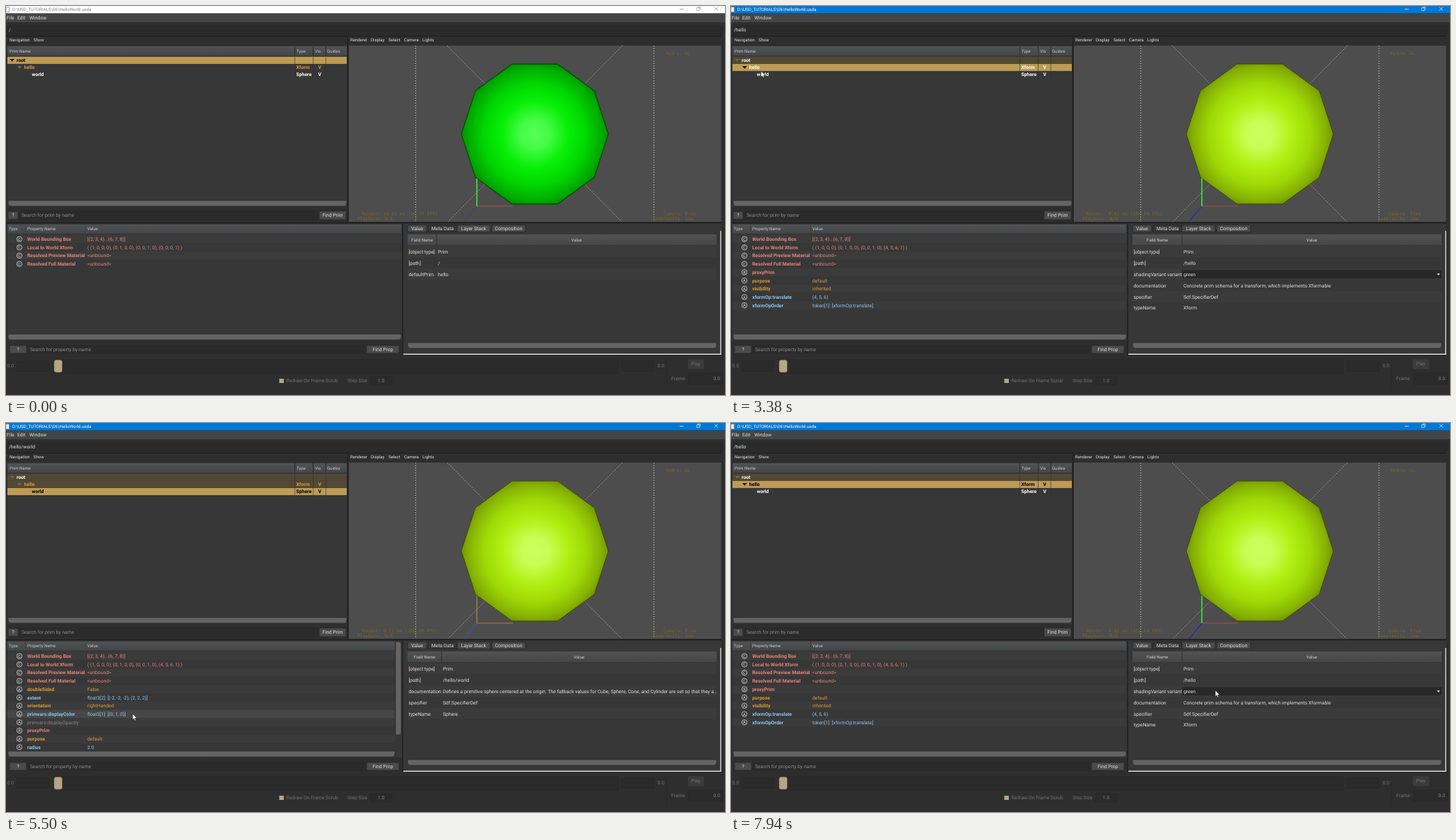
Recreate the animation shown at these times as an HTML page with a canvas. Size 1017 px wide and 550 px high, loop 7990 ms.

```html
<!DOCTYPE html>
<html lang="en">
<head>
<meta charset="utf-8">
<title>Scene viewer</title>
<style>
html, body { margin: 0; width: 100%; height: 100%; overflow: hidden; background: #2e2e2e; }
canvas { display: block; }
</style>
</head>
<body>
<canvas id="stage" width="1017" height="550"></canvas>
<script>
const g = document.getElementById('stage').getContext('2d');
const LOOP = 7990;
const SALMON = '#e88578', ORANGE = '#de9a35', BLUE = '#8cc5f0', GREY = '#858585';
const LIGHT = '#e0e0e0', GOLD = '#bd9b54', DIM = '#777470';

// Cursor legs: start, end, control point, end point
const START = [948, 109];
const LEGS = [
  [420, 930, 720, 50, 495, 4],
  [1180, 1390, 498, 14, 498, 27],
  [1600, 2350, 170, 272, 41, 90],
  [3350, 3450, 44, 94, 46, 98],
  [3680, 4130, 300, 150, 663, 340],
  [4160, 4930, 450, 581, 100, 398],
  [5010, 5200, 40, 395, 16, 411],
  [5200, 5460, 100, 411, 179, 411],
  [5560, 5790, 170, 411, 162, 411],
  [5820, 5950, 156, 411, 150, 411],
  [6360, 6860, 100, 250, 54, 103],
  [6980, 7140, 50, 95, 46, 87],
  [7330, 7900, 300, 200, 685, 378]
];

const COMMON = xf => [
  ['C', 'World Bounding Box', '[(2, 3, 4)...(6, 7, 8)]', SALMON],
  ['C', 'Local to World Xform', `( (1, 0, 0, 0), (0, 1, 0, 0), (0, 0, 1, 0), (${xf}) )`, SALMON],
  ['C', 'Resolved Preview Material', '<unbound>', SALMON],
  ['C', 'Resolved Full Material', '<unbound>', SALMON]
];

const PRIMS = [
  {
    name: 'root', type: '', path: '/', split: 609,
    stats: '10.02 ms (99.77 FPS)',
    props: COMMON('0, 0, 0, 1'),
    meta: [['[object type]', 'Prim'], ['[path]', '/'], ['defaultPrim', 'hello']]
  },
  {
    name: 'hello', type: 'Xform', path: '/hello', split: 638,
    stats: '9.82 ms (101.84 FPS)',
    props: [
      ...COMMON('4, 5, 6, 1'),
      ['R', 'proxyPrim', '', SALMON],
      ['A', 'purpose', 'default', ORANGE],
      ['A', 'visibility', 'inherited', ORANGE],
      ['A', 'xformOp:translate', '(4, 5, 6)', BLUE],
      ['A', 'xformOpOrder', 'token[1]: [xformOp:translate]', BLUE]
    ],
    meta: [
      ['[object type]', 'Prim'], ['[path]', '/hello'], ['shadingVariant variant', 'green', true],
      ['documentation', 'Concrete prim schema for a transform, which implements Xformable'],
      ['specifier', 'Sdf.SpecifierDef'], ['typeName', 'Xform']
    ]
  },
  {
    name: 'world', type: 'Sphere', path: '/hello/world', split: 616,
    stats: '9.71 ms (103.00 FPS)',
    props: [
      ...COMMON('4, 5, 6, 1'),
      ['A', 'doubleSided', 'False', ORANGE],
      ['A', 'extent', 'float3[2]: [(-2, -2, -2), (2, 2, 2)]', BLUE],
      ['A', 'orientation', 'rightHanded', ORANGE],
      ['A', 'primvars:displayColor', 'float3[1]: [(0, 1, 0)]', BLUE],
      ['A', 'primvars:displayOpacity', '', GREY],
      ['R', 'proxyPrim', '', SALMON],
      ['A', 'purpose', 'default', ORANGE],
      ['A', 'radius', '2.0', BLUE]
    ],
    meta: [
      ['[object type]', 'Prim'], ['[path]', '/hello/world'],
      ['documentation', 'Defines a primitive sphere centered at the origin. The fallback values for Cube, Sphere, Cone, and Cylinder are set so that they a...'],
      ['specifier', 'Sdf.SpecifierDef'], ['typeName', 'Sphere']
    ]
  }
];

function rect(x0, y0, x1, y1, fill) {
  g.fillStyle = fill;
  g.fillRect(x0, y0, x1 - x0, y1 - y0);
}

function round(x0, y0, x1, y1, r, fill, stroke) {
  g.beginPath();
  g.roundRect(x0, y0, x1 - x0, y1 - y0, r);
  g.fillStyle = fill;
  g.fill();
  if (stroke) {
    g.strokeStyle = stroke;
    g.lineWidth = 0.7;
    g.stroke();
  }
}

function line(x0, y0, x1, y1, color, width = 1, dash = []) {
  g.beginPath();
  g.moveTo(x0, y0);
  g.lineTo(x1, y1);
  g.strokeStyle = color;
  g.lineWidth = width;
  g.setLineDash(dash);
  g.stroke();
  g.setLineDash([]);
}

// y is the middle of the capitals
function text(s, x, y, color = LIGHT, { size = 6.85, bold = false, align = 'left', font = 'Roboto, sans-serif' } = {}) {
  g.font = `${bold ? 'bold ' : ''}${size}px ${font}`;
  g.textAlign = align;
  g.fillStyle = color;
  g.fillText(s, x, y + 2.4);
}

function poly(points, fill, stroke, width = 1) {
  g.beginPath();
  points.forEach(([x, y]) => g.lineTo(x, y));
  g.closePath();
  g.fillStyle = fill;
  g.fill();
  if (stroke) {
    g.strokeStyle = stroke;
    g.lineWidth = width;
    g.stroke();
  }
}

function header(x0, y0, x1, y1) {
  const shade = g.createLinearGradient(0, y0, 0, y1);
  shade.addColorStop(0, '#505356');
  shade.addColorStop(1, '#44474a');
  rect(x0, y0, x1, y1, shade);
}

function button(x0, y0, x1, y1, label) {
  round(x0, y0, x1, y1, 1.5, '#4b4b4b', '#282828');
  text(label, (x0 + x1) / 2, (y0 + y1) / 2, LIGHT, { align: 'center' });
}

const field = (x0, y0, x1, y1) => round(x0, y0, x1, y1, 1.5, '#2b2b2b', '#272727');
const scrollbar = (x0, y0, x1, y1) => round(x0, y0, x1, y1, [1, 1, 4, 4], '#646464', '#2a2a2a');

function cursorAt(t) {
  let [x, y] = START;
  for (const [t0, t1, cx, cy, ex, ey] of LEGS) {
    if (t < t0) break;
    const k = Math.min(1, (t - t0) / (t1 - t0));
    const u = k * k * (3 - 2 * k), v = 1 - u;
    x = v * v * x + 2 * u * v * cx + u * u * ex;
    y = v * v * y + 2 * u * v * cy + u * u * ey;
  }
  return [x, y];
}

function titleBar(active) {
  rect(0, 0, 1017, 10.5, active ? '#0078d7' : '#fdfdfd');
  round(0, 1.5, 4.5, 8.5, 0.5, '#f4f4f4', '#888');
  const color = active ? '#fff' : '#858585';
  text('D:\\USD_TUTORIALS\\06\\HelloWorld.usda', 9, 5, color, { size: 6.17 });
  line(953, 4.5, 958.5, 4.5, color, 0.7);
  g.strokeStyle = color;
  g.lineWidth = 0.6;
  g.strokeRect(977, 2.7, 3.8, 3.8);
  line(978.2, 1.4, 982.2, 1.4, color, 0.6);
  line(982.2, 1.4, 982.2, 5.4, color, 0.6);
  line(1002, 1.5, 1007, 6.5, color, 0.7);
  line(1007, 1.5, 1002, 6.5, color, 0.7);
}

function menus(path) {
  rect(0, 10.5, 1017, 23, '#444546');
  [['File', 1], ['Edit', 16], ['Window', 33]].forEach(([s, x]) => text(s, x, 17));
  field(1, 28, 1013, 40);
  text(path, 4, 34);
  const small = { size: 6 };
  [['Navigation', 5], ['Show', 39], ['Renderer', 487], ['Display', 516],
   ['Select', 541], ['Camera', 563], ['Lights', 589]].forEach(([s, x]) => text(s, x, 48, LIGHT, small));
  line(0, 42.5, 1012, 42.5, '#1c1c1c');
}

function tree(sel, mx, my) {
  const small = { size: 6 };
  rect(2, 56, 482, 284, '#373737');
  header(2, 57, 482, 70);
  [['Prim Name', 5], ['Type', 411], ['Vis', 437], ['Guides', 454]].forEach(([s, x]) => text(s, x, 63.5, '#c8c8c8', small));
  const inTree = mx < 482 && my > 72 && my < 108;
  PRIMS.forEach((p, i) => {
    const y = 76.8 + i * 10.1, chosen = i === sel;
    if (chosen || i < sel) rect(2, y - 5, 482, y + 5, chosen ? GOLD : '#514835');
    const hover = inTree && !chosen && Math.abs(my - y) < 5;
    if (hover) {
      g.strokeStyle = '#858585';
      g.lineWidth = 0.8;
      g.strokeRect(24.5, y - 4.6, 457, 9.2);
    }
    const color = chosen ? (inTree ? '#fff' : '#000') : i === 1 ? ORANGE : '#fff';
    const bold = { bold: true };
    const x = 15 + i * 10.7;
    if (i < 2) {
      const a = x - 9.7;
      poly([[a, y - 1.8], [a + 6.6, y - 1.8], [a + 3.3, y + 1.8]], chosen ? '#111' : '#75684c');
    }
    text(p.name, x, y, color, bold);
    text(p.type, 410.5, y, color, bold);
    if (i) text('V', 441.5, y, color, bold);
  });
  [408.5, 434.5, 452.5].forEach(x => {
    line(x, 57, x, 70, '#2a2a2a');
    line(x, 72, x, 102, 'rgba(45,45,45,.7)', 0.8);
  });
  scrollbar(3, 275, 482, 283);
  button(3, 290.5, 17, 301.5, '?');
  field(19, 290, 440, 302);
  text('Search for prim by name', 22, 296, '#8c8c8c');
  button(443, 290, 481, 302, 'Find Prim');
  line(483.5, 43, 483.5, 305, '#1c1c1c');
}

function viewport(sel) {
  g.save();
  g.beginPath();
  g.rect(485, 56, 526.5, 249);
  g.clip();
  rect(485, 56, 1012, 305, '#4d4d4d');
  const dash = [1.5, 2];
  const guide = '#bcbcbc';
  line(579.5, 56, 579.5, 305, guide, 0.9, dash);
  line(916.5, 56, 916.5, 305, guide, 0.9, dash);
  line(624, 56, 872, 306, guide, 0.9, dash);
  line(872, 56, 624, 306, guide, 0.9, dash);

  const cx = 748, cy = 181, r = 104;
  const shade = g.createRadialGradient(cx, cy, 0, cx, cy, r);
  const colors = sel
    ? ['#ccff60', '#c6ff54', '#b0f012', '#9ed806', '#86b203', '#729600']
    : ['#56ff56', '#46fc46', '#08f008', '#00d600', '#00ac00', '#009000'];
  [0, 0.19, 0.45, 0.7, 0.9, 1].forEach((s, i) => shade.addColorStop(s, colors[i]));
  const rim = Array.from({ length: 10 }, (_, i) => {
    const a = i * Math.PI / 5;
    return [cx + r * Math.cos(a), cy + r * Math.sin(a)];
  });
  poly(rim, shade, sel ? '#3c4a10' : '#0a540a', sel ? 1 : 1.6);

  line(666, 283, 648, 305, ['#45456a', '#2828c0', '#3c4cb4'][sel], 1.2);
  line(666, 283, 717, 283, ['#a85d42', '#b84a38', '#b87a3c'][sel], 1.2);
  line(666, 244, 666, 283, sel === 2 ? '#a0a03c' : '#3ce63c', sel === 2 ? 1 : 1.6);

  const hud = { size: 6.4, font: '"DejaVu Sans Mono", monospace' };
  [['Hydra: GL', 933, 66.5], [`Render: ${PRIMS[sel].stats}`, 503, 293.5], ['Playback: N/A', 497, 300.5],
   ['Camera: Free', 930, 293.5], ['Complexity: Low', 915, 300.5]].forEach(([s, x, y]) => text(s, x, y, '#7d662a', hud));
  g.restore();
}

function properties(prim, mx, my) {
  const tall = prim.props.length > 10, right = tall ? 550 : 559;
  rect(2, 308, 560, 473, '#373737');
  header(2, 309, right, 321.5);
  [['Type', 4], ['Property Name', 30], ['Value', 115]].forEach(([s, x]) => text(s, x, 315, '#c8c8c8', { size: 6 }));
  [27.5, 112.5].forEach(x => line(x, 309, x, 321, '#3a3c3e', 0.8));
  prim.props.forEach(([kind, name, value, color], i) => {
    const y = 329.6 + i * 11.7;
    const hover = mx < right && Math.abs(my - y) < 5.85;
    rect(2, y - 5.85, right, y + 5.85, hover ? '#474747' : i % 2 ? '#373737' : '#3b3b3b');
    g.beginPath();
    g.arc(19, y, 3.7, 0, 7);
    g.strokeStyle = '#d8d8d8';
    g.lineWidth = 0.8;
    g.stroke();
    text(kind, 19, y - 0.3, '#e8e8e8', { size: 5.8, align: 'center' });
    text(name, 30, y, color, { bold: color !== GREY });
    text(value, 115, y, color);
  });
  if (tall) round(551, 309, 559, 441, [1, 4, 4, 1], '#646464', '#2a2a2a');
  scrollbar(3, 464, right, 472);
  button(5, 480, 29, 491, '?');
  field(31, 480, 507, 491);
  text('Search for property by name', 34, 485.5, '#8c8c8c');
  button(510, 480, 556, 491, 'Find Prop');
}

function metadata({ meta, split }, mx, my) {
  rect(562, 308, 1012, 493, '#373737');
  [['Value', 568, 595], ['Meta Data', 597, 638], ['Layer Stack', 638, 685], ['Composition', 687, 735]].forEach(([s, a, b], i) => {
    round(a, 309.5, b, 319.5, [2, 2, 0, 0], i === 1 ? '#373737' : '#4a4a4a', '#222');
    text(s, (a + b) / 2, 314.3, LIGHT, { align: 'center' });
  });
  header(568, 323, 1005, 338);
  text('Field Name', (568 + split) / 2, 330.5, '#d0d0d0', { size: 6, align: 'center' });
  text('Value', (split + 1005) / 2, 330.5, '#d0d0d0', { size: 6, align: 'center' });
  line(split, 323, split, 338, '#2a2a2a', 0.8);
  meta.forEach(([name, value, combo], i) => {
    const y = 347.3 + i * 15.95;
    rect(568, y - 8, 1005, y + 8, i % 2 ? '#373737' : '#3b3b3b');
    if (combo) {
      round(638, y - 6, 1005, y + 6, 1, '#282828');
      poly([[998.5, y - 1], [1003, y - 1], [1000.7, y + 1.5]], '#e8e8e8');
    } else if (mx > split && mx < 1005 && Math.abs(my - y) < 8) {
      rect(split, y - 8, 1005, y + 8, '#424242');
    }
    text(name, 569.5, y);
    text(value, split + 2, y);
  });
  scrollbar(568, 476, 1005, 484);
  rect(1010.3, 318, 1011.5, 493, '#f0f0f0');
  rect(562, 491.7, 1011.5, 493, '#f0f0f0');
  line(561, 308, 561, 493, '#1c1c1c');
  line(0, 306.5, 1012, 306.5, '#1c1c1c');
}

function timeline() {
  rect(0, 493.5, 1017, 550, '#2e2e2e');
  [[15, 502, 61, 516.5], [67, 500, 866, 519], [871, 502, 917, 516.5], [515, 524, 546, 536], [965, 519, 1013, 535]]
    .forEach(b => field(...b));
  text('0.0', 1.5, 509, DIM);
  text('0.0', 921.5, 509, DIM);
  round(68, 500.5, 79.5, 518, 3, '#b9a582', '#6a604e');
  round(964, 499, 988, 514, 1.5, '#3b3b3b', '#2a2a2a');
  text('Play', 969, 506, DIM);
  text('Frame:', 941, 526.5, DIM);
  text('0.0', 1010, 526.5, '#8a8680', { align: 'right' });
  line(934.5, 497, 934.5, 540, '#292929');
  rect(386.5, 527, 393, 533, '#b9a582');
  text('Redraw On Frame Scrub', 396.5, 530, DIM);
  text('Step Size', 483, 530, DIM);
  text('1.0', 530.5, 530, '#8a8680', { align: 'center' });
  rect(0, 546.5, 1017, 550, '#322a2b');
}

function pointer(x, y) {
  const shape = [[0, 0], [0, 8.8], [2, 7], [3.4, 10], [4.8, 9.4], [3.5, 6.4], [6.3, 6.3]];
  poly(shape.map(([a, b]) => [x + a, y + b]), '#fff', '#111', 0.6);
}

function draw(now) {
  const t = now % LOOP;
  const [mx, my] = cursorAt(t);
  const sel = t < 2510 ? 0 : t < 3520 ? 1 : t < 7240 ? 2 : 1;
  const prim = PRIMS[sel];
  rect(0, 0, 1017, 550, '#2e2e2e');
  titleBar(t >= 1180);
  menus(prim.path);
  tree(sel, mx, my);
  viewport(sel);
  properties(prim, mx, my);
  metadata(prim, mx, my);
  timeline();
  if (t >= 1180 && t < 1390) {
    g.beginPath();
    g.arc(495, 5, 6, 0, 7);
    g.fillStyle = '#62c257';
    g.fill();
  }
  if (t >= 420) pointer(mx, my);
}

g.textRendering = 'geometricPrecision';
function tick() {
  draw(performance.now());
  requestAnimationFrame(tick);
}
tick();
</script>
</body>
</html>
```
